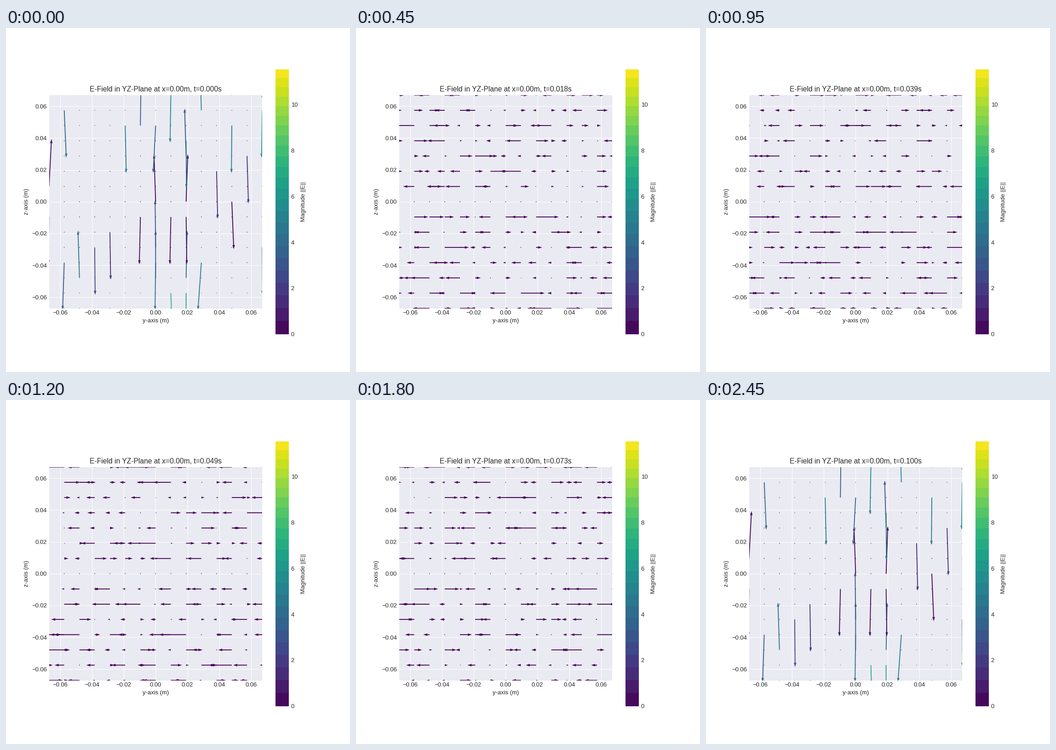
Recreate the animation shown at these times as a matplotlib script. Size 748 px wide and 748 px high, loop 2500 ms.

```python
import numpy as np
import matplotlib.pyplot as plt
from matplotlib.animation import FuncAnimation
from matplotlib.cm import ScalarMappable
from matplotlib.colors import BoundaryNorm, ListedColormap

FRAMES, INTERVAL = 50, 50
DURATION = 0.1          # simulated seconds
EXTENT, N = 0.067, 15   # half width of the plane, points per side
MID = N // 2
E_MAX = 11.54
PEAK_LENGTH = 103       # arrow lengths are in pixels
PEAK_SHARE = 0.155      # part of the points with a spike
LEAN, SPREAD = 2.8, 22
BANDS = 24
INK = "0.15"

plt.rcParams.update({
    "font.family": "Liberation Sans",
    "text.color": INK, "axes.labelcolor": INK,
    "xtick.color": INK, "ytick.color": INK,
    "xtick.major.size": 0, "ytick.major.size": 0,
    "xtick.minor.size": 0, "ytick.minor.size": 0,
    "axes.facecolor": "#EAEAF2", "axes.linewidth": 0,
    "axes.edgecolor": "white", "axes.axisbelow": True,
    "axes.grid": True, "grid.color": "white", "grid.linestyle": "-",
})


def peak_field():
    """Sparse vertical spikes, stronger away from z = 0."""
    rng = np.random.default_rng(7)
    shape = (N, N)
    spike = rng.random(shape) < PEAK_SHARE
    u = spike * rng.normal(0, LEAN, shape)
    v = spike * rng.choice([-PEAK_LENGTH, PEAK_LENGTH], shape)
    height = np.abs(np.arange(N) - MID)[:, None] / MID
    mag = E_MAX * height**1.5 * rng.uniform(0.4, 1, shape)
    return u, v, mag


def weak_field(frame):
    """Scattered sideways field, zero along z = 0."""
    rng = np.random.default_rng(frame)
    u = rng.normal(0, SPREAD, (N, N))
    u[MID] = 0
    return u, np.zeros((N, N)), np.zeros((N, N))


def field(frame):
    """Spikes at both ends of the period, weak field between."""
    return weak_field(frame) if 0 < frame < FRAMES - 1 else peak_field()


fig, ax = plt.subplots(figsize=(8, 8), dpi=93.5)
axis = np.linspace(-EXTENT, EXTENT, N)
Y, Z = np.meshgrid(axis, axis)
quiver = ax.quiver(Y, Z, *field(0), cmap="viridis", clim=(0, E_MAX),
                   scale=1, scale_units="dots")

ticks = np.linspace(-0.06, 0.06, 7)
ax.set(xticks=ticks, yticks=ticks, aspect="equal",
       xlim=(-EXTENT, EXTENT), ylim=(-EXTENT, EXTENT),
       xlabel="y-axis (m)", ylabel="z-axis (m)")
title = ax.set_title("")

# The bands get thinner towards the top
step = np.linspace(0, 1, BANDS + 1)
edges = E_MAX * (1.2 * step - 0.2 * step**2)
middles = (edges[:-1] + edges[1:]) / 2
band_cmap = ListedColormap(plt.get_cmap("viridis")(middles / E_MAX))
bar = fig.colorbar(ScalarMappable(BoundaryNorm(edges, BANDS), band_cmap),
                   ax=ax, spacing="proportional", ticks=range(0, 11, 2))
bar.set_label("Magnitude ||E||", labelpad=5)
bar.minorticks_off()


def update(frame):
    t = DURATION * frame / (FRAMES - 1)
    quiver.set_UVC(*field(frame))
    title.set_text(f"E-Field in YZ-Plane at x=0.00m, t={t:.3f}s")
    return quiver, title


anim = FuncAnimation(fig, update, frames=FRAMES, interval=INTERVAL,
                     repeat=True, repeat_delay=0)
plt.show()
```
